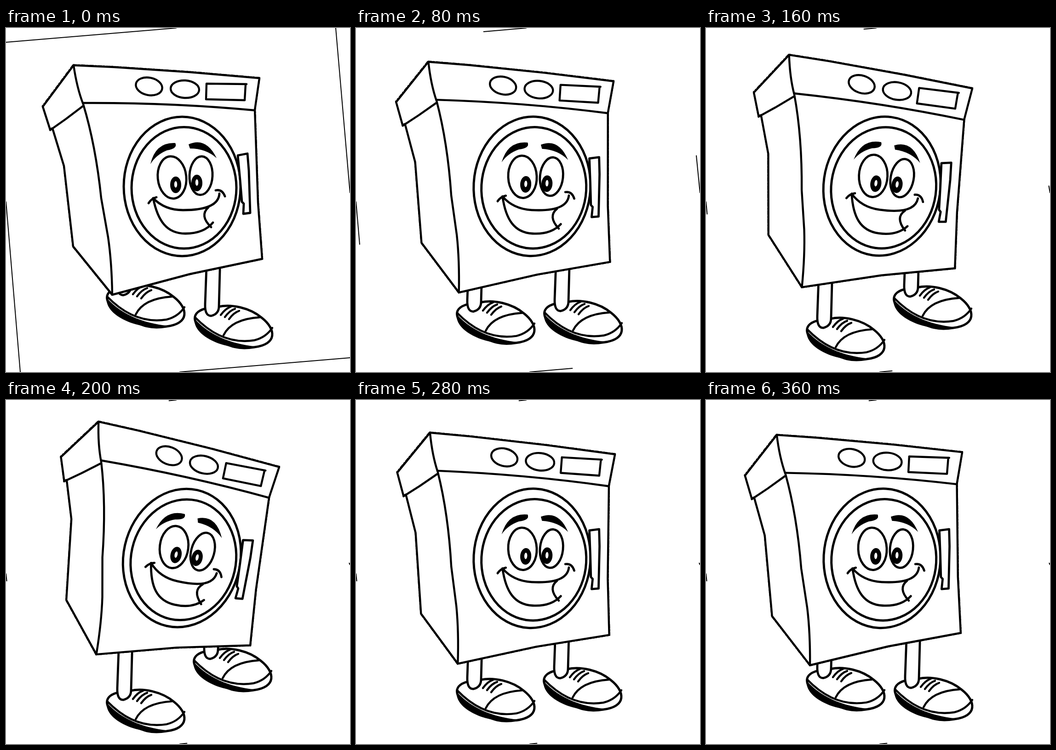
An HTML page with a canvas for the animation above (400 ms loop, 748 by 748 pixels).

```html
<!DOCTYPE html>
<html lang="en">
<head>
<meta charset="utf-8">
<title>Walking washing machine</title>
<style>
  html, body { margin: 0; width: 100%; height: 100%; overflow: hidden; background: #fff; }
  canvas { display: block; }
</style>
</head>
<body>
<canvas id="stage" width="748" height="748"></canvas>
<script>
const ctx = document.getElementById('stage').getContext('2d');
const FRAME_MS = 40, STEPS = 10;

const path = d => new Path2D(d);

function oval(x, y, rx, ry, tilt = 0) {
  const shape = new Path2D();
  shape.ellipse(x, y, rx, ry, tilt, 0, 2 * Math.PI);
  return shape;
}

const box = path('M147 81L235 85 400 96 551 109 541 178 548 380 557 502 400 535 231 580 ' +
  '146 475 126 300 101 218 96 221 80 171Z');
const boxLines = [
  path('M147 81Q154 130 168 166Q195 255 207 370L222 455Q230 510 231 580'),
  path('M168 163Q360 162 541 179'),
  path('M96 222L130 198 167 170'),
  oval(311, 127, 29, 19, 0.2),
  oval(389, 133, 31, 19, 0.06),
  path('M523 122L436 121 435 155 519 157 521 122')
];

const door = [oval(383, 344.5, 127, 151.5), oval(387, 347.5, 114, 132)];
const handle = path('M504 277L525 273 528 310 531 402 516 404 517 382 513 378 509 330Z');
const eyes = [oval(361, 325, 31, 46, -0.1), oval(424, 321, 25, 42, 0.05)];
const pupils = [oval(369, 341, 12, 18), oval(415, 337, 12, 18)];
const glints = [oval(369, 340, 3.2, 7), oval(415, 336, 3.2, 7)];
const brows = [
  path('M314 296Q325 248 368 250Q374 262 350 266Q326 276 314 296'),
  path('M397 253Q435 236 458 283Q435 262 400 262Z')
];
const smile = [
  path('M310 381Q316 371 327 368'),
  path('M456 353Q470 350 476 366'),
  path('M320 370Q345 396 385 396Q462 396 464 360'),
  path('M320 370C330 420 350 447 390 447Q430 447 450 423'),
  path('M440 390Q420 408 446 433')
];

const shoe = path('M434 610C395 620 410 650 440 667C490 697 510 699 540 694' +
  'C590 688 588 655 556 630C530 608 490 600 462 606Z');
const sole = path('M410 632C405 670 480 706 552 693C500 690 445 672 410 632');
const shoeLines = [
  path('M411 629Q470 690 540 679Q565 673 579 652'),
  path('M473 668Q490 633 552 629')
];
for (let i = 0; i < 3; i++) {
  shoeLines.push(path(`M${467 + 9 * i} ${624 + 4.5 * i}q10 -14 22 -18`));
}
const leg = path('M437 490L433 600Q432 626 446 626Q463 622 463 605L466 490');

function stroke(shapes, width) {
  ctx.lineWidth = width;
  shapes.forEach(shape => ctx.stroke(shape));
}

function fill(shapes, color) {
  ctx.fillStyle = color;
  shapes.forEach(shape => ctx.fill(shape));
}

function turned(degrees, x, y, drawPart) {
  ctx.save();
  ctx.translate(x, y);
  ctx.rotate(degrees * Math.PI / 180);
  ctx.translate(-x, -y);
  drawPart();
  ctx.restore();
}

// The tilted paper edge, drawn once and turned to each side
function drawEdges(length) {
  for (let side = 0; side < 4; side++) {
    const begin = side === 2 ? 390 : 378;
    turned(-90 * side, 374, 374, () =>
      stroke([path(`M0 ${begin}L${0.083 * length} ${374 + length}`)], 2));
  }
}

function drawFoot(x, y) {
  ctx.save();
  ctx.translate(x, y);
  fill([shoe], '#fff');
  stroke([shoe], 5);
  stroke(shoeLines, 4.4);
  fill([sole], '#000');
  fill([leg], '#fff');
  stroke([leg], 4.8);
  ctx.restore();
}

function drawBox() {
  fill([box], '#fff');
  stroke([box, ...boxLines], 4.4);
  // Rough fringe just outside the box
  ctx.translate(330, 330);
  ctx.scale(1.008, 1.008);
  ctx.translate(-330, -330);
  ctx.setLineDash([9, 2, 4, 3]);
  ctx.lineCap = 'butt';
  stroke([box], 1);
}

function drawFace() {
  stroke(door, 5);
  fill([handle], '#fff');
  stroke([handle, ...eyes, ...smile], 4.8);
  fill([...brows, ...pupils], '#000');
  fill(glints, '#fff');
}

function draw(now) {
  const step = Math.floor(now / FRAME_MS) % STEPS;
  // Stride runs from 0 to 4 and back, lingering as the feet pass each other
  const strideAt = k => k < 2 ? k : Math.max(k - 1, (k + 1) / 2);
  const turnAt = stride => 1.35 * stride + 2.35 * Math.max(0, stride - 2);
  const stride = strideAt(5 - Math.abs(5 - step));
  const widestTurn = turnAt(strideAt(Math.min(step, 5)));
  const faceTurn = 3.2 * Math.min(stride, 1) + 4.8 * Math.max(0, stride - 2);

  ctx.fillStyle = '#fff';
  ctx.fillRect(0, 0, 748, 748);
  ctx.strokeStyle = '#000';
  ctx.lineCap = ctx.lineJoin = 'round';
  drawEdges(Math.min(374, 195 / widestTurn));
  drawFoot(-191, -45 + 23.7 * Math.min(stride, 3));
  drawFoot(-Math.min(2, Math.max(0, 2 * stride - 2)), -21 * Math.max(0, stride - 1));
  turned(turnAt(stride), 366, 371, drawBox);
  turned(faceTurn, 387, 342, drawFace);
}

const start = performance.now();
function loop() {
  draw(performance.now() - start);
  requestAnimationFrame(loop);
}
loop();
</script>
</body>
</html>
```
